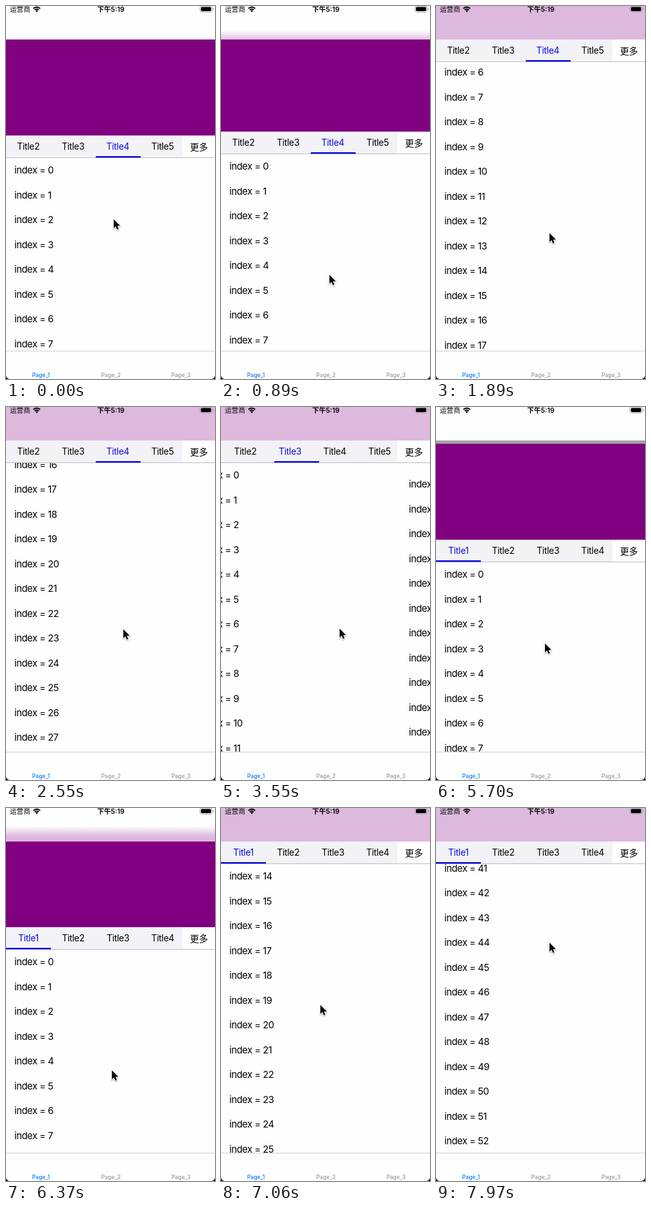
An HTML page with a canvas that plays this animation: 326 by 579 pixels, repeating every 8000 ms.

```html
<!DOCTYPE html>
<html lang="zh">
<head>
<meta charset="utf-8">
<style>
html, body { margin: 0; width: 100%; height: 100%; overflow: hidden; background: #fdfdfd; }
canvas { display: block; }
</style>
</head>
<body>
<canvas id="stage" width="326" height="579"></canvas>
<script>
const ctx = document.getElementById('stage').getContext('2d');
const W = 326, H = 579, LOOP = 8000;
const NAV = 52, HEAD = 149, BAR = 34, FOOT = 535, TAB = 69.8, ROW = 38.5;
const PAPER = '#fefefe', BLUE = '#0b0be0';
const SANS = 'Inter, "Noto Sans", sans-serif';
const CJK = '"Noto Sans CJK SC", "Noto Sans CJK", sans-serif';

// [time, value] keys
const scrollFirst = [[20, 0], [400, -70], [790, 0], [840, 0], [1150, 125], [1450, 262],
  [1620, 300], [1780, 325], [1890, 382], [2150, 610], [2400, 755], [2670, 789.5]];
const scrollLast = [[4650, 149], [4950, 80], [5250, 8], [5440, 0], [5640, 0], [5700, -5],
  [5960, -70], [6240, 0], [6290, 0], [6600, 165], [6850, 480], [7060, 687],
  [7300, 870], [7600, 1260], [7970, 1738.5], [8000, 1765]];
const pageKeys = [[3150, 3], [3380, 2.76], [3550, 2.141], [3760, 2], [3950, 2], [4050, 1.76],
  [4200, 1.12], [4310, 1], [4370, 1], [4470, 0.748], [4600, 0.12], [4740, 0]];
const tabKeys = [[3380, 70], [3550, 67], [3850, 35], [4330, 35], [4470, 30], [4760, 0]];
const cursorX = [[0, 168], [400, 166], [1200, 172], [1890, 177], [2150, 186], [2460, 183],
  [3020, 183], [3150, 130], [3550, 185], [3900, 140], [4150, 225], [4340, 146],
  [4470, 227], [4700, 215], [5200, 180], [5700, 170], [6300, 166], [7060, 155],
  [7500, 180], [7970, 177]];
const cursorY = [[0, 331], [400, 458], [840, 430], [1250, 235], [1600, 390], [1780, 405],
  [1890, 353], [2150, 215], [2460, 345], [3020, 345], [3550, 344], [4470, 368],
  [4700, 300], [5250, 430], [5550, 358], [5700, 367], [5960, 480], [6290, 440],
  [6700, 220], [6950, 330], [7060, 306], [7300, 190], [7560, 350], [7970, 209]];

// Monotone cubic interpolation, flat at turning points
function at(keys, t) {
  const last = keys.length - 1;
  if (t <= keys[0][0]) return keys[0][1];
  if (t >= keys[last][0]) return keys[last][1];
  let i = 0;
  while (keys[i + 1][0] <= t) i++;
  const rate = k => (keys[k + 1][1] - keys[k][1]) / (keys[k + 1][0] - keys[k][0]);
  const slope = k => {
    if (k === 0 || k === last) return 0;
    const a = rate(k - 1), b = rate(k);
    return a * b > 0 ? 2 * a * b / (a + b) : 0;
  };
  const [t0, v0] = keys[i], [t1, v1] = keys[i + 1];
  const d = t1 - t0, u = (t - t0) / d, w = 1 - u;
  return w * w * (1 + 2 * u) * v0 + u * u * (3 - 2 * u) * v1
    + d * u * w * (w * slope(i) - u * slope(i + 1));
}

function rect(x, y, w, h, color) {
  ctx.fillStyle = color;
  ctx.fillRect(x, y, w, h);
}

function text(str, x, y, font, color = '#000', spacing = 0, align = 'left') {
  ctx.font = font;
  ctx.fillStyle = color;
  ctx.letterSpacing = spacing + 'px';
  ctx.textAlign = align;
  ctx.fillText(str, x, y);
}

function clipped(x, y, w, h, paint) {
  ctx.save();
  ctx.beginPath();
  ctx.rect(x, y, w, h);
  ctx.clip();
  paint();
  ctx.restore();
}

function drawList(x, top, offset) {
  const first = Math.max(0, Math.floor(offset / ROW) - 1);
  for (let i = first; i < first + 15; i++) {
    const y = top + 59 + i * ROW - offset;
    text('index = ' + i, x + 13, Math.round(y), '14.8px ' + SANS, '#000', -0.45);
  }
}

function drawTabs(top, page, shift) {
  rect(0, top, W, BAR, '#f2f2f7');
  const chosen = Math.floor(page + 0.002);
  for (let i = 0; i < 5; i++) {
    text('Title' + (i + 1), i * TAB - shift + 35, top + 22, '14px ' + SANS,
      i === chosen ? BLUE : '#000', -0.3, 'center');
  }
  rect(275, top, W - 275, BAR, PAPER);
  text('更多', 301, top + 22.5, '14px ' + CJK, '#000', 0, 'center');
  rect(0, top + BAR, W, 1, '#bdbdc0');
  rect(Math.round(page * 70 - shift), top + BAR - 2, 70, 2.4, BLUE);
}

function drawNav(hidden) {
  rect(0, 0, W, NAV, PAPER);
  if (hidden <= 0) return;
  const edge = NAV - hidden;
  const tint = ctx.createLinearGradient(0, edge - 8, 0, edge + 8);
  tint.addColorStop(0, 'rgba(222,185,222,0)');
  tint.addColorStop(1, 'rgb(222,185,222)');
  rect(0, 0, W, NAV, tint);
}

function drawStatus() {
  text('运营商', 6, 9, '10.6px ' + CJK);
  text('下午5:19', 163.5, 9, '600 10.6px Inter, ' + CJK, '#000', 0, 'center');
  ctx.strokeStyle = '#000';
  ctx.lineWidth = 1.9;
  for (const r of [4.6, 7.6]) {
    ctx.beginPath();
    ctx.arc(48, 9.3, r, -Math.PI * 0.75, -Math.PI * 0.25);
    ctx.stroke();
  }
  ctx.fillStyle = '#000';
  ctx.beginPath();
  ctx.moveTo(48, 9.8);
  ctx.arc(48, 9.3, 2.8, -Math.PI * 0.75, -Math.PI * 0.25);
  ctx.fill();
  ctx.strokeStyle = '#a5a5a5';
  ctx.lineWidth = 1;
  ctx.beginPath();
  ctx.roundRect(302.5, 0, 19, 9.5, 3);
  ctx.stroke();
  ctx.fillStyle = '#000';
  ctx.beginPath();
  ctx.roundRect(304, 1.5, 16, 6.5, 1.7);
  ctx.fill();
  rect(323, 3.2, 1.2, 3.4, '#a5a5a5');
}

function drawFooter() {
  rect(0, FOOT, W, H - FOOT, PAPER);
  rect(0, FOOT, W, 1.3, '#d8d8d8');
  ['Page_1', 'Page_2', 'Page_3'].forEach((name, i) =>
    text(name, 54.5 + i * 109.2, 576, '500 8.7px ' + SANS, i ? '#999' : '#0a7aff', 0, 'center'));
  ctx.fillStyle = '#000';
  for (const side of [0, W]) {
    const dir = side ? -1 : 1;
    ctx.beginPath();
    ctx.moveTo(side, H);
    ctx.lineTo(side, H - 5);
    ctx.quadraticCurveTo(side + dir, H - 1, side + dir * 5, H);
    ctx.fill();
  }
}

function drawCursor(x, y) {
  const points = [[0, 0], [0, 14], [3.2, 11], [5.4, 16], [7.7, 15], [5.6, 10.2], [10, 10]];
  ctx.save();
  ctx.translate(x, y);
  ctx.beginPath();
  points.forEach(p => ctx.lineTo(...p));
  ctx.closePath();
  ctx.shadowColor = 'rgba(0,0,0,.35)';
  ctx.shadowBlur = 2;
  ctx.shadowOffsetY = 1;
  ctx.strokeStyle = '#fff';
  ctx.lineWidth = 2;
  ctx.lineJoin = 'round';
  ctx.stroke();
  ctx.shadowColor = 'transparent';
  ctx.fillStyle = '#000';
  ctx.fill();
  ctx.restore();
}

function draw(t) {
  const scroll = at(t < 4000 ? scrollFirst : scrollLast, t);
  const page = at(pageKeys, t);
  const hidden = Math.round(Math.min(HEAD, t > 2700 && t < 4600 ? HEAD : scroll));
  const top = NAV + HEAD - hidden;
  const listTop = top + BAR + 1;

  rect(0, 0, W, H, PAPER);
  if (hidden < 0) rect(0, NAV, W, -hidden, '#a3a3a3');
  rect(0, NAV - hidden, W, HEAD, '#800080');
  clipped(0, listTop, W, FOOT - listTop, () => {
    for (let i = 0; i < 4; i++) {
      const x = Math.round((i - page) * W);
      if (Math.abs(x) >= W) continue;
      const moved = i === 3 || (i === 0 && t > 4600);
      drawList(x, top, moved ? Math.max(0, scroll - HEAD, i === 3 && t > 2700 ? 640.5 : 0) : 0);
    }
  });
  drawTabs(top, page, at(tabKeys, t));
  drawNav(hidden);
  drawStatus();
  drawFooter();
  drawCursor(at(cursorX, t), at(cursorY, t));
}

const start = performance.now();
function tick() {
  draw((performance.now() - start) % LOOP);
  requestAnimationFrame(tick);
}
tick();
</script>
</body>
</html>
```
